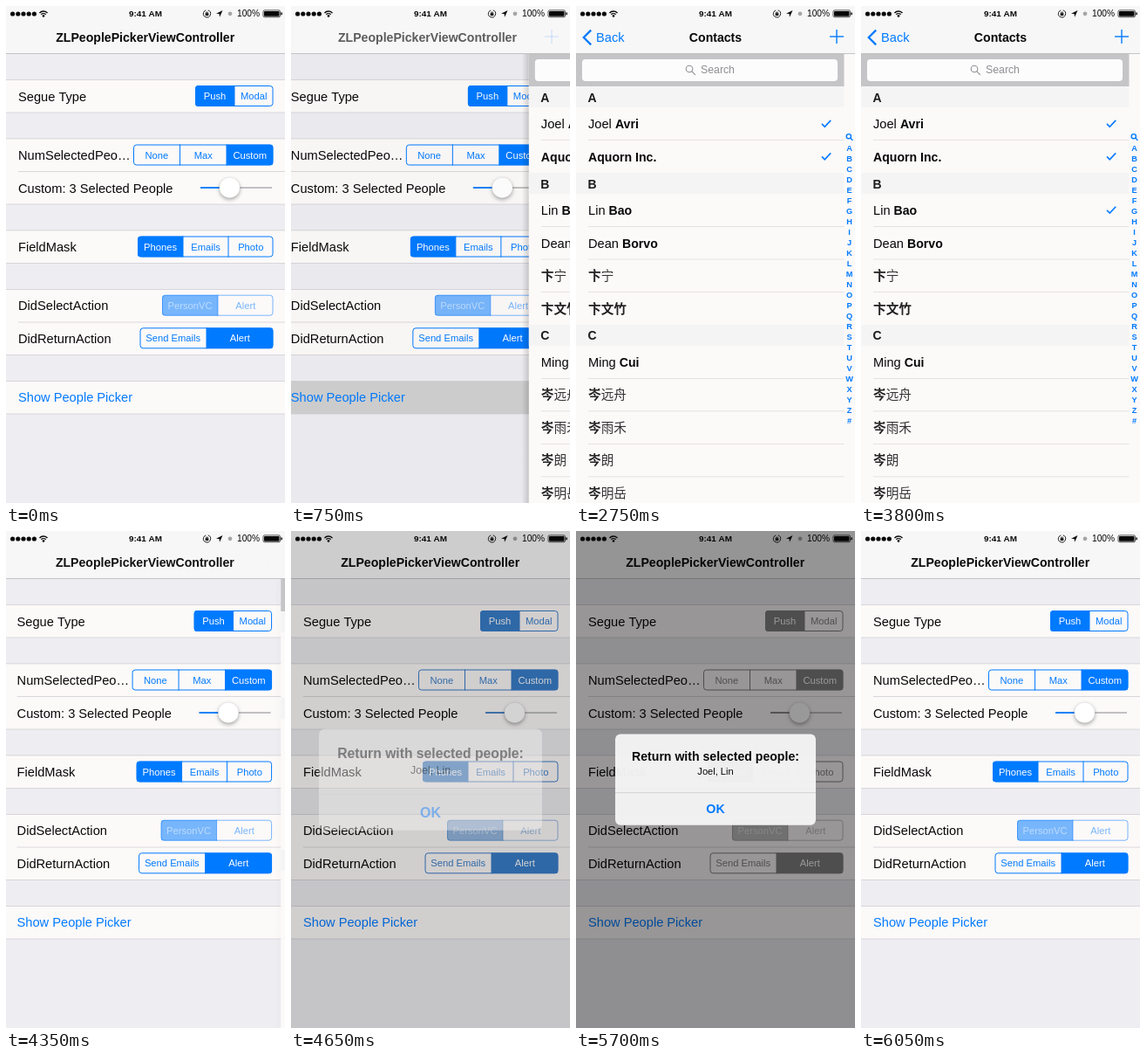
Animation, 320 px wide and 569 px high, one loop 6100 ms. Source, as an HTML page with a canvas:

```html
<!DOCTYPE html>
<html lang="en">
<head>
<meta charset="utf-8">
<title>People picker</title>
<style>
html, body { margin: 0; width: 100%; height: 100%; overflow: hidden; background: #eeeef2; }
canvas { display: block; width: 320px; height: 569px; }
</style>
</head>
<body>
<canvas id="stage"></canvas>
<script>
const W = 320, H = 569, LOOP = 6100;
const BLUE = '#007aff', INK = '#080808', PAPER = '#fcf9f9', GROUND = '#eeeef2', LINE = '#d0cfd2';
const ROW = 37.5;
const SANS = '"Liberation Sans", Arial, "Noto Sans CJK SC", "Noto Sans CJK", sans-serif';
const REG = 14.65, BOLD = 14.1;
const TAP = 650, PUSH = 714, POP = 4013, ALERT_IN = 4570, ALERT_OUT = 5750;

const canvas = document.getElementById('stage');
const c = canvas.getContext('2d');
const dpr = window.devicePixelRatio || 1;
canvas.width = Math.round(W * dpr);
canvas.height = Math.round(H * dpr);

const clamp = v => Math.max(0, Math.min(1, v));
const mix = (a, b, k) => a + (b - a) * k;

// Critically damped spring from 0 to 1
function spring(ms) {
  if (ms <= 0) return 0;
  const u = 18.26 * ms / 1000;
  return u > 11 ? 1 : 1 - (1 + u) * Math.exp(-u);
}

function text(s, x, y, { size = REG, bold = false, color = INK, align = 'left' } = {}) {
  c.font = `${bold ? 'bold ' : ''}${size}px ${SANS}`;
  c.fillStyle = color;
  c.textAlign = align;
  c.fillText(s, x, y);
  return c.measureText(s).width;
}

function rect(x, y, w, h, color) {
  c.fillStyle = color;
  c.fillRect(x, y, w, h);
}

function round(x, y, w, h, r) {
  c.beginPath();
  c.roundRect(x, y, w, h, r);
}

function disc(x, y, r, color) {
  c.beginPath();
  c.arc(x, y, r, 0, Math.PI * 2);
  c.fillStyle = color;
  c.fill();
}

function stroke(points, color, width) {
  c.beginPath();
  points.forEach(([x, y], i) => i ? c.lineTo(x, y) : c.moveTo(x, y));
  c.strokeStyle = color;
  c.lineWidth = width;
  c.stroke();
}

function magnifier(x, y, r, color, width) {
  c.beginPath();
  c.arc(x, y, r, 0, Math.PI * 2);
  c.strokeStyle = color;
  c.lineWidth = width;
  c.stroke();
  stroke([[x + r * 0.7, y + r * 0.7], [x + r * 1.8, y + r * 1.8]], color, width);
}

function faded(alpha, draw) {
  if (alpha <= 0) return;
  c.save();
  c.globalAlpha *= Math.min(1, alpha);
  draw();
  c.restore();
}

function shifted(x, draw) {
  c.save();
  c.translate(x, 0);
  draw();
  c.restore();
}

// edges: left, dividers, right; on: selected part
function segments(mid, edges, labels, on, tint) {
  const x = edges[0], right = edges[edges.length - 1], y = mid - 12, h = 24;
  c.save();
  round(x, y, right - x, h, 3.5);
  c.clip();
  rect(edges[on], y, edges[on + 1] - edges[on], h, tint);
  c.restore();
  round(x + 0.5, y + 0.5, right - x - 1, h - 1, 3.2);
  c.strokeStyle = tint;
  c.lineWidth = 1;
  c.stroke();
  edges.slice(1, -1).forEach(e => rect(e - 0.5, y, 1, h, tint));
  labels.forEach((s, i) => text(s, (edges[i] + edges[i + 1]) / 2, mid + 4,
    { size: 11.2, color: i === on ? '#fff' : tint, align: 'center' }));
}

function group(y, rows) {
  const h = rows * ROW;
  rect(0, y, W, h, PAPER);
  rect(0, y - 0.5, W, 0.8, LINE);
  rect(0, y + h - 0.4, W, 0.8, LINE);
  if (rows > 1) rect(14, y + ROW - 0.4, W - 14, 0.8, LINE);
}

function slider(tint) {
  rect(223, 207.2, 82, 1.7, '#b7b7b9');
  rect(223, 207.2, 33, 1.7, tint);
  c.save();
  c.shadowColor = 'rgba(0,0,0,.32)';
  c.shadowBlur = 4 * dpr;
  c.shadowOffsetY = 2 * dpr;
  disc(256.5, 208, 11.8, '#fff');
  c.restore();
  c.beginPath();
  c.arc(256.5, 208, 11.8, 0, Math.PI * 2);
  c.strokeStyle = 'rgba(0,0,0,.12)';
  c.lineWidth = 0.5;
  c.stroke();
}

function settings(press, grey) {
  const tint = `rgb(${mix(0, 130, grey)},${mix(122, 130, grey)},${mix(255, 130, grey)})`;
  rect(0, 54, W, H - 54, GROUND);
  group(84.5, 1);
  group(152, 2);
  group(257, 1);
  group(324.5, 2);
  group(429.5, 1);
  faded(press, () => rect(0, 429.5, W, ROW, '#cfcfcf'));

  text('Segue Type', 14, 108.5);
  text('NumSelectedPeo…', 14, 176);
  text('Custom: 3 Selected People', 14, 213.5);
  text('FieldMask', 14, 280.5);
  text('DidSelectAction', 14, 348);
  text('DidReturnAction', 14, 385.5);
  text('Show People Picker', 14, 453, { color: BLUE });

  segments(103, [217, 262, 306.5], ['Push', 'Modal'], 0, tint);
  segments(170.5, [146, 199.5, 253, 306.5], ['None', 'Max', 'Custom'], 2, tint);
  slider(tint);
  segments(275.5, [151, 203, 255, 306.5], ['Phones', 'Emails', 'Photo'], 0, tint);
  faded(0.52, () => segments(342.7, [179, 243, 306.5], ['PersonVC', 'Alert'], 0, tint));
  segments(380.3, [153.5, 230, 306.5], ['Send Emails', 'Alert'], 1, tint);
}

// Each contact: light part, bold part, time of its check mark; CJK puts the bold part first
const contacts = [
  ['A', [['Joel', 'Avri', 1600], ['', 'Aquorn Inc.', 2300]]],
  ['B', [['Lin', 'Bao', 3000], ['Dean', 'Borvo'], ['宁', '卞'], ['', '卞文竹']]],
  ['C', [['Ming', 'Cui'], ['远舟', '岑'], ['雨禾', '岑'], ['朗', '岑'], ['明岳', '岑']]]
];

function contact(light, strong, y) {
  const cjk = strong.charCodeAt(0) > 0x2fff;
  if (cjk) {
    const w = text(strong, 14, y, { bold: true, color: '#222' });
    text(light, 14 + w, y, { color: '#333' });
  } else {
    const w = light ? text(light + ' ', 14, y) : 0;
    text(strong, 14 + w, y, { size: BOLD, bold: true });
  }
}

function picker(t) {
  rect(0, 54, W, H - 54, PAPER);
  rect(0, 54, 307.5, 38, '#c5c5c8');
  round(7, 61, 293, 25, 4);
  c.fillStyle = '#fdfcfd';
  c.fill();
  magnifier(130, 72, 3.8, '#8e8e93', 1.1);
  text('Search', 143, 77.3, { size: 12.3, color: '#8e8e93' });

  let y = 92.2;
  for (const [letter, people] of contacts) {
    rect(0, y, 307.5, 23.9, '#f5f4f4');
    text(letter, 13.5, y + 17.4, { size: 14, bold: true, color: '#1c1c1c' });
    y += 23.9;
    people.forEach(([light, strong, at], i) => {
      const mid = y + ROW / 2;
      contact(light, strong, mid + 5.3);
      if (t >= at) stroke([[282, mid], [285.3, mid + 3.4], [292.2, mid - 4]], BLUE, 1.6);
      y += ROW;
      if (i < people.length - 1) rect(14, y - 0.4, 293.5, 0.8, '#dedcde');
    });
  }

  magnifier(312.8, 149.2, 2.6, BLUE, 1.4);
  [...'ABCDEFGHIJKLMNOPQRSTUVWXYZ#'].forEach((s, i) =>
    text(s, 313.6, 166.3 + i * 12, { size: 9.2, bold: true, color: BLUE, align: 'center' }));
}

function statusBar() {
  for (let i = 0; i < 5; i++) disc(7.6 + i * 6.2, 9, 2.6, INK);
  c.strokeStyle = INK;
  c.lineWidth = 1.4;
  for (const r of [3.6, 6.2]) {
    c.beginPath();
    c.arc(43, 12.2, r, -Math.PI * 0.76, -Math.PI * 0.24);
    c.stroke();
  }
  disc(43, 11.4, 1.3, INK);
  text('9:41 AM', 160, 12.2, { size: 9.9, bold: true, align: 'center' });

  c.beginPath();
  c.arc(230.5, 8.8, 4.1, -Math.PI * 0.4, Math.PI * 1.4);
  c.strokeStyle = INK;
  c.lineWidth = 0.9;
  c.stroke();
  rect(228.7, 8.2, 3.6, 2.8, INK);
  c.beginPath();
  c.arc(230.5, 8.2, 1.2, Math.PI, 0);
  c.stroke();

  c.beginPath();
  [[248.5, 5], [241, 8.8], [244.6, 9.1], [245, 12.8]].forEach(p => c.lineTo(...p));
  c.fillStyle = INK;
  c.fill();

  disc(257, 8.8, 2.4, '#a5a5a5');
  text('100%', 265, 12.4, { size: 10.2 });
  round(295, 4.9, 19.5, 7.8, 1.6);
  c.strokeStyle = INK;
  c.lineWidth = 0.7;
  c.stroke();
  round(296, 5.9, 17.5, 5.8, 0.8);
  c.fillStyle = INK;
  c.fill();
  rect(315.4, 7.4, 1.4, 2.8, INK);
}

function navBar(p) {
  rect(0, 0, W, 54.5, '#f8f7f7');
  rect(0, 54, W, 0.8, '#b8b8ba');
  const title = { size: BOLD, bold: true, align: 'center' };
  const late = clamp((p - 0.3) / 0.7);
  faded(1 - p * 2.4, () => text('ZLPeoplePickerViewController', 159.7 - 22 * p, 41, title));
  faded(late, () => {
    text('Contacts', 160 + 100 * (1 - p), 41, title);
    text('Back', 23 + 60 * (1 - p), 41, { color: BLUE });
    stroke([[17.2, 27.6], [8.8, 36], [17.2, 44.4]], BLUE, 2.3);
  });
  faded(p, () => {
    stroke([[291, 35], [307, 35]], BLUE, 1.4);
    stroke([[299, 27], [299, 43]], BLUE, 1.4);
  });
  statusBar();
}

function alertBox(show, scale) {
  faded(show, () => {
    c.translate(160, 285);
    c.scale(scale, scale);
    c.translate(-160, -285);
    round(45, 232.5, 230, 104.3, 6);
    c.fillStyle = 'rgba(245,244,244,.97)';
    c.fill();
    text('Return with selected people:', 160, 262.8, { size: BOLD, bold: true, align: 'center' });
    text('Joel, Lin', 160, 278.5, { size: 11.1, align: 'center' });
    rect(45, 299.3, 230, 0.8, '#c9c9cb');
    text('OK', 160, 323.3, { size: 14.3, bold: true, color: BLUE, align: 'center' });
  });
}

function draw(t) {
  c.setTransform(dpr, 0, 0, dpr, 0, 0);
  c.clearRect(0, 0, W, H);
  const p = t < POP ? spring(t - PUSH) : 1 - spring(t - POP);
  const leaving = t >= ALERT_OUT;
  const opened = spring(t - ALERT_IN);
  const show = leaving ? 1 - clamp((t - ALERT_OUT) / 250) : opened;
  const press = t < TAP ? 0 : t < POP ? 1 : p;

  rect(0, 0, W, H, GROUND);
  if (p < 0.999) shifted(-96 * p, () => settings(press, show));
  if (p > 0.001) {
    const x = W * (1 - p);
    rect(0, 54, x, H - 54, `rgba(0,0,0,${0.1 * p})`);
    const shade = c.createLinearGradient(x - 8, 0, x, 0);
    shade.addColorStop(0, 'rgba(0,0,0,0)');
    shade.addColorStop(1, `rgba(0,0,0,${0.16 * clamp(p * 7)})`);
    rect(x - 8, 54, 8, H - 54, shade);
    shifted(x, () => picker(t));
  }
  navBar(p);
  rect(0, 0, W, H, `rgba(0,0,0,${0.4 * show})`);
  alertBox(show, leaving ? 1 : 1.2 - 0.2 * opened);
}

function frame() {
  draw(performance.now() % LOOP);
  requestAnimationFrame(frame);
}
frame();
</script>
</body>
</html>
```
